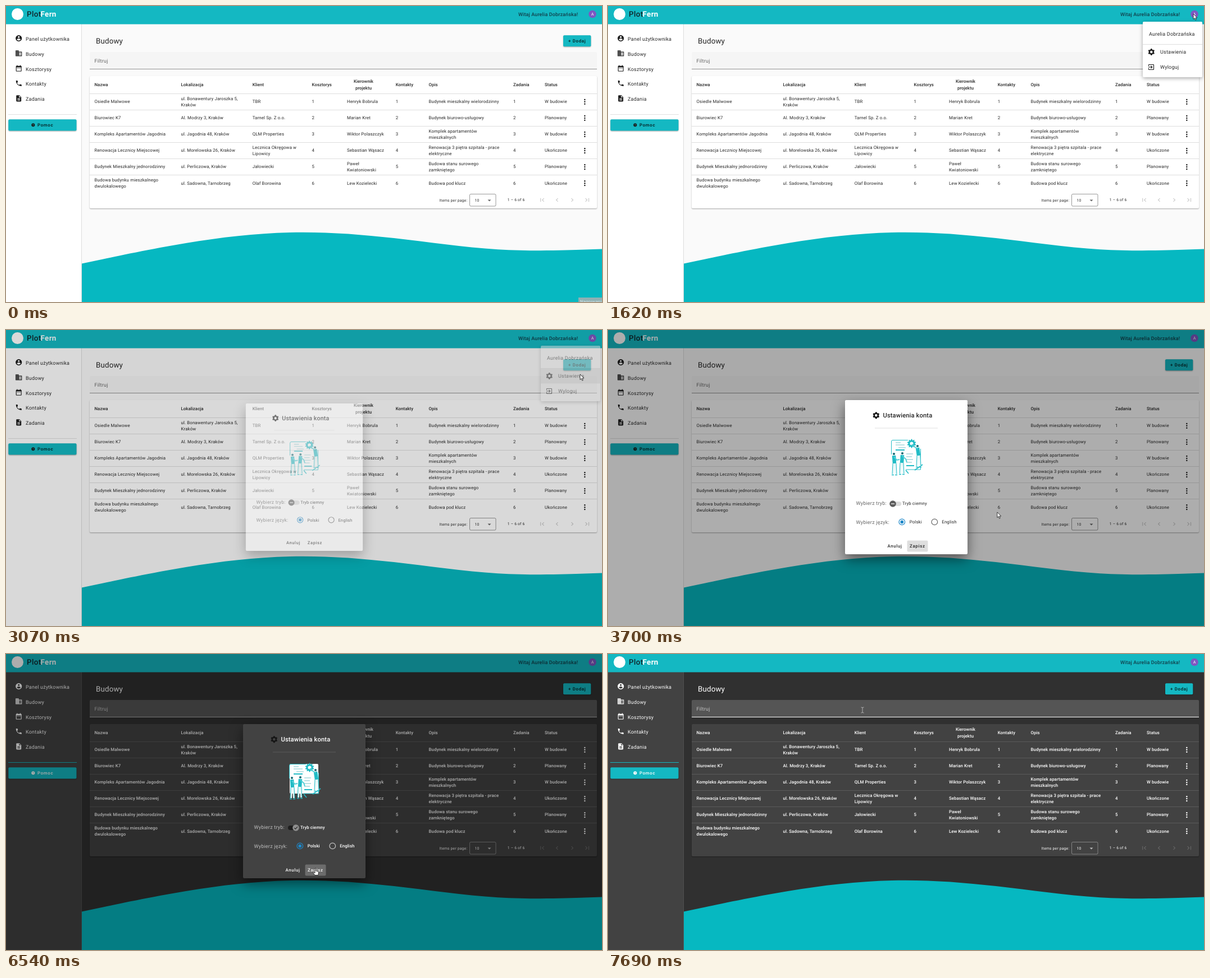
These frames come from a looping animation (1061x528 px, 8000 ms). An HTML page with a canvas:

```html
<!DOCTYPE html>
<html lang="pl">
<head>
<meta charset="utf-8">
<style>
html, body { margin: 0; width: 100%; height: 100%; overflow: hidden; background: #fafafa; }
canvas { display: block; }
</style>
</head>
<body>
<canvas id="stage" width="1061" height="528"></canvas>
<script>
const stage = document.getElementById('stage');
const sheet = stage.cloneNode();
const sheetCtx = sheet.getContext('2d');
let c = stage.getContext('2d');
const LOOP = 8000, K = 0.5593; // K: stage pixels per page pixel
const TEAL = '#14b8c2';

const LIGHT = {
  page: '#fafafa', panel: '#fff', edge: '#dcdcdc', ink: 'rgba(0,0,0,.85)', icon: '#1c1c1c',
  line: 'rgba(0,0,0,.13)', field: '#f5f5f5', under: 'rgba(0,0,0,.42)', underHover: 'rgba(0,0,0,.87)',
  off: 'rgba(0,0,0,.22)', soft: 'rgba(0,0,0,.6)', box: 'rgba(0,0,0,.4)', rule: '#e0e0e0',
  press: 'rgba(0,0,0,.13)', radio: 'rgba(0,0,0,.6)', body: { w: 400, ls: 0.25 }
};
const DARK = {
  page: '#303030', panel: '#424242', edge: '#505050', ink: '#fff', icon: '#fff',
  line: 'rgba(255,255,255,.13)', field: '#555', under: 'rgba(255,255,255,.6)', underHover: '#fff',
  off: 'rgba(255,255,255,.2)', soft: 'rgba(255,255,255,.65)', box: 'rgba(255,255,255,.35)', rule: TEAL,
  press: 'rgba(255,255,255,.22)', radio: 'rgba(255,255,255,.7)', body: { w: 500, ls: 0.13 }
};

const HEADS = ['Nazwa', 'Lokalizacja', 'Klient', 'Kosztorys', '', 'Kontakty', 'Opis', 'Zadania', 'Status'];
const COLS = [157.5, 311.5, 438.7, 544.5, 607, 693.7, 752.5, 903, 959];
const ROWS = [
  ['Osiedle Malwowe', 'ul. Bonawentury Jaroszka 5,|Kraków', 'TBR', 'Henryk Bobrula', 'Budynek mieszkalny wielorodzinny', 'W budowie'],
  ['Biurowiec K7', 'Al. Modrzy 3, Kraków', 'Tarnel Sp. Z o.o.', 'Marian Kret', 'Budynek biurowo-usługowy', 'Planowany'],
  ['Kompleks Apartamentów Jagodnia', 'ul. Jagodnia 48, Kraków', 'QLM Properties', 'Wiktor Polaszczyk', 'Komplek apartamentów|mieszkalnych', 'W budowie'],
  ['Renowacja Lecznicy Miejscowej', 'ul. Morelowska 26, Kraków', 'Lecznica Okręgowa w|Lipowicy', 'Sebastian Wąsacz', 'Renowacja 3 piętra szpitala - prace|elektryczne', 'Ukończone'],
  ['Budynek Mieszkalny jednorodzinny', 'ul. Perliczowa, Kraków', 'Jałowiecki', 'Paweł|Kwiatoniowski', 'Budowa stanu surowego|zamkniętego', 'Planowany'],
  ['Budowa budynku mieszkalnego|dwulokalowego', 'ul. Sadowna, Tarnobrzeg', 'Olaf Borowina', 'Lew Kozielecki', 'Budowa pod klucz', 'Ukończone']
];
const USER = 'Aurelia Dobrzańska';

const windows = [5, 9, 13, 17].map(y => `M4 ${y}h2v2h-2zM8 ${y}h2v2h-2z`).join('');
const ICON = {
  user: 'M12 2a10 10 0 1 0 0 20a10 10 0 1 0 0-20zM12 5a3 3 0 1 1 0 6a3 3 0 1 1 0-6zM12 19.2c-2.5 0-4.71-1.28-6-3.22.03-1.99 4-3.08 6-3.08 1.99 0 5.97 1.09 6 3.08-1.29 1.94-3.5 3.22-6 3.22z',
  building: 'M2 3h10v4h10v14H2z' + windows + 'M12 9h8v10h-8v-2h2v-2h-2v-2h2v-2h-2zM16 11h2v2h-2zM16 15h2v2h-2z',
  calendar: 'M5 4h1V2h2v2h8V2h2v2h1q2 0 2 2v14q0 2-2 2H5q-2 0-2-2V6q0-2 2-2zM5 9v11h14V9zM7 11h2v2H7zM11 11h2v2h-2zM15 11h2v2h-2z',
  phone: 'M6.62 10.79c1.44 2.83 3.76 5.14 6.59 6.59l2.2-2.2c.27-.27.67-.36 1.02-.24 1.12.37 2.33.57 3.57.57q1 0 1 1V20q0 1-1 1A17 17 0 0 1 3 4q0-1 1-1h3.5q1 0 1 1c0 1.25.2 2.45.57 3.57.11.35.03.74-.25 1.02z',
  doc: 'M6 2h8l6 6v12q0 2-2 2H6q-2 0-2-2V4q0-2 2-2zM8 12v2h8v-2zM8 16v2h8v-2zM13 3.5V9h5.5z',
  exit: 'M10.1 15.6L11.5 17l5-5-5-5-1.4 1.4L12.7 11H3v2h9.7zM3 9V5q0-2 2-2h14q2 0 2 2v14q0 2-2 2H5q-2 0-2-2v-4h2v4h14V5H5v4z',
  prev: 'M15.4 7.4L14 6l-6 6 6 6 1.4-1.4L10.8 12z',
  first: 'M18.4 16.6L13.8 12l4.6-4.6L17 6l-6 6 6 6zM6 6h2v12H6z'
};
for (const k in ICON) ICON[k] = new Path2D(ICON[k]);
const ARROW = new Path2D('M0 0V9.6L2.2 7.6 3.7 11.2 5.3 10.5 3.8 7H6.9z');
const HAND = new Path2D('M-1 1Q-1 0 0 0T1 1V5L4 5.6Q5.5 6 5.4 7.5L4.8 12.5H-1.2L-4 8.2Q-4.4 6.8-3.2 7L-1 8.6z');
const IBEAM = new Path2D('M-2.5 -5Q0 -5 0 -3.8Q0 -5 2.5 -5M0 -4V4M-2.5 5Q0 5 0 3.8Q0 5 2.5 5');
const WAVE = wavePath([459.5, 420, 398, 411.5, 440, 433.5], 135, 926 / 5);

// Cubic B-spline through evenly spaced control heights, closed along the bottom.
function wavePath(ys, left, step) {
  const path = new Path2D(), last = ys.length - 1;
  const at = (i, u) => [left + (i + u) * step, ys[i] + (ys[i + 1] - ys[i]) * u];
  path.moveTo(left, ys[0]);
  path.lineTo(...at(0, 1 / 6));
  for (let i = 0; i < last; i++) {
    const end = i < last - 1
      ? [left + (i + 1) * step, (ys[i] + 4 * ys[i + 1] + ys[i + 2]) / 6]
      : at(i, 5 / 6);
    path.bezierCurveTo(...at(i, 1 / 3), ...at(i, 2 / 3), ...end);
  }
  path.lineTo(left + last * step, ys[last]);
  path.lineTo(left + last * step, 528);
  path.lineTo(left, 528);
  return path;
}

const part = (t, a, b) => Math.min(1, Math.max(0, (t - a) / (b - a)));
const within = (p, x, y, w, h) => p.x >= x && p.x <= x + w && p.y >= y && p.y <= y + h;

function rect(x, y, w, h, fill, r = 0) {
  c.fillStyle = fill;
  c.beginPath();
  c.roundRect(x, y, w, h, r);
  c.fill();
}
function card(x, y, w, h, fill, blur = 2, dy = 1, shade = 'rgba(0,0,0,.35)') {
  c.save();
  c.shadowColor = shade;
  c.shadowBlur = blur;
  c.shadowOffsetY = dy;
  rect(x, y, w, h, fill, 2);
  c.restore();
}
function disc(x, y, r, fill) {
  c.fillStyle = fill;
  c.beginPath();
  c.arc(x, y, r, 0, 7);
  c.fill();
}
function stroke(path, color, width = 1) {
  c.strokeStyle = color;
  c.lineWidth = width;
  c.stroke(new Path2D(path));
}
function text(s, x, y, size, color, { w = 400, ls = 0.25, align = 'left' } = {}) {
  const px = size * K;
  c.textRendering = 'geometricPrecision';
  c.font = `${w} ${px}px Roboto, sans-serif`;
  c.letterSpacing = ls * K + 'px';
  c.textAlign = align;
  c.fillStyle = color;
  c.fillText(s, x, y + px * 0.355);
}
function icon(name, x, y, color, scale = K, flip = 1) {
  c.save();
  c.translate(x, y);
  c.scale(scale * flip, scale);
  c.translate(-12, -12);
  c.fillStyle = color;
  c.fill(ICON[name], 'evenodd');
  c.restore();
}
function gear(x, y, r, color, teeth = 6) {
  c.fillStyle = color;
  c.beginPath();
  for (let i = 0; i < teeth * 4; i++) {
    const a = (i - 0.5) * Math.PI / teeth / 2, d = i % 4 < 2 ? r : r * 0.76;
    c.lineTo(x + d * Math.sin(a), y - d * Math.cos(a));
  }
  c.closePath();
  c.moveTo(x + r * 0.37, y);
  c.arc(x, y, r * 0.37, 0, 7);
  c.fill('evenodd');
}
// Paints a group on its own sheet, then fades it in as one.
function layer(alpha, scale, x, y, paint) {
  if (alpha <= 0) return;
  const main = c;
  c = sheetCtx;
  c.clearRect(0, 0, 1061, 528);
  c.save();
  c.translate(x, y);
  c.scale(scale, scale);
  c.translate(-x, -y);
  paint();
  c.restore();
  c = main;
  c.globalAlpha = alpha;
  c.drawImage(sheet, 0, 0);
  c.globalAlpha = 1;
}

const MOVES = [
  [60, 1012, 526], [860, 1040, 46], [1200, 1042, 14], [1640, 1042, 14], [1680, 1036, 30],
  [2370, 1022, 79], [3130, 1022, 79], [3700, 693, 325], [4460, 510, 311], [4800, 510, 311],
  [5350, 551, 382], [6570, 551, 382], [7340, 455, 132], [7690, 453, 100]
];
function pointer(t) {
  const i = MOVES.findIndex(m => m[0] > t);
  if (i < 0) return { x: 453, y: 100 };
  const a = MOVES[Math.max(0, i - 1)], b = MOVES[i];
  const p = part(t, a[0], b[0]), e = (p + p * p * (3 - 2 * p)) / 2;
  return { x: a[1] + (b[1] - a[1]) * e, y: a[2] + (b[2] - a[2]) * e };
}

function header() {
  rect(0, 0, 1061, 32.6, TEAL);
  disc(20.5, 14.5, 10.5, '#fff');
  text('Plot', 37, 14.5, 24, '#10242a', { w: 500, ls: 0.6 });
  text('Fern', 61.5, 14.5, 24, '#fff', { w: 700, ls: 0.6 });
  text(`Witaj ${USER}!`, 912, 14.5, 16, '#123f4a', { w: 500 });
  disc(1044, 14.5, 6.8, '#7e57c2');
  text('A', 1044, 14.7, 13, '#fff', { align: 'center', ls: 0 });
}

function sidebar(T) {
  rect(0, 32, 134, 496, T.panel);
  rect(134, 32, 1, 496, T.edge);
  [['user', 'Panel użytkownika'], ['building', 'Budowy'], ['calendar', 'Kosztorysy'], ['phone', 'Kontakty'], ['doc', 'Zadania']]
    .forEach(([name, label], i) => {
      const y = 58.8 + i * 26.8;
      icon(name, 22.7, y - 1.2, T.icon);
      text(label, 35, y, 16, T.ink, { ls: 0.45 });
    });
  rect(4, 193, 122, 1, T.rule);
  card(4.3, 202.3, 121.2, 20.2, TEAL);
  disc(48.3, 212.3, 3, T.icon);
  text('?', 48.3, 212.4, 8, TEAL, { w: 700, align: 'center', ls: 0 });
  text('Pomoc', 56, 212.3, 14, T.ink, { w: 500, ls: 1.25 });
}

function table(T) {
  card(149, 125, 903, 236, T.panel);
  HEADS.forEach((s, i) => text(s, COLS[i], 140.5, 14, T.ink, { w: 500, ls: 0.1 }));
  ['Kierownik', 'projektu'].forEach((s, i) =>
    text(s, 636.5, 134 + i * 12.3, 14, T.ink, { w: 500, ls: 0.1, align: 'center' }));
  ROWS.forEach(([name, place, client, boss, about, state], i) => {
    const y = 170.4 + i * 29.08, n = String(i + 1);
    rect(149, Math.round(y - 14.6), 903, 1, T.line);
    [name, place, client, n, boss, n, about, n, state].forEach((s, col) => {
      const lines = s.split('|');
      lines.forEach((l, k) => text(l, COLS[col], y + (k - (lines.length - 1) / 2) * 11.3, 14, T.ink, T.body));
    });
    for (const d of [-3.9, 0, 3.9]) disc(1030.3, y + 0.4 + d, 1.25, T.icon);
  });
  text('Items per page:', 771.7, 346.5, 12, T.ink, { ls: 0.4 });
  c.strokeStyle = T.box;
  c.lineWidth = 1;
  c.beginPath();
  c.roundRect(825.5, 335.5, 46.5, 21.5, 2);
  c.stroke();
  text('10', 834.5, 346.5, 12, T.ink, { ls: 0.4 });
  c.fillStyle = T.soft;
  c.fill(new Path2D('M857.5 345.5h6l-3 3z'));
  text('1 – 6 of 6', 892.8, 346, 12, T.ink, { ls: 0.4 });
  icon('first', 954.5, 346, T.off);
  icon('prev', 981, 346, T.off);
  icon('prev', 1008, 346, T.off, K, -1);
  icon('first', 1034.7, 346, T.off, K, -1);
}

function page(t, T, over) {
  rect(0, 0, 1061, 528, T.page);
  c.fillStyle = '#06b8c1';
  c.fill(WAVE);
  sidebar(T);
  header();
  text('Budowy', 160, 62.5, 24, T.ink, { ls: 0.2 });
  card(992, 52.3, 49.3, 20, TEAL);
  text('+ Dodaj', 1001, 62.3, 14, 'rgba(0,0,0,.87)', { w: 500, ls: 1.25 });
  rect(149, 82, 903, 30, T.field, [2, 2, 0, 0]);
  rect(149, 112, 903, 1, over ? T.underHover : T.under);
  text('Filtruj', 157.5, 97.5, 16, t < 4850 ? LIGHT.soft : T.soft, { ls: 0.45 });
  table(T);
  if (t < 400) {
    rect(1019, 520, 42, 8, '#8fb0b3');
    text('Nagrywanie', 1022, 527, 14, '#dfe9ea');
  }
}

function menu(t) {
  const open = part(t, 1450, 1570);
  layer(open * (1 - part(t, 3010, 3130)), 0.8 + 0.2 * open, 1058, 28, () => {
    card(952, 28, 106, 99, '#fff', 7, 2);
    if (t > 2920) rect(952, 68.5, 106, 27, 'rgba(0,0,0,.1)');
    rect(952, 68, 106, 1, '#dedede');
    text(USER, 963, 50, 16, LIGHT.ink, { ls: 0.45 });
    gear(967.3, 82, 6, '#1c1c1c');
    text('Ustawienia', 983, 82, 16, LIGHT.ink, { ls: 0.45 });
    icon('exit', 967, 109, '#1c1c1c');
    text('Wyloguj', 983, 109, 16, LIGHT.ink, { ls: 0.45 });
  });
}

function worker(x, y, lean, arm) {
  disc(x + lean, y - 1, 2.1, '#176b75');
  stroke(`M${x + lean} ${y + 2}L${x} ${y + 16}`, '#22bcc6', 6.5);
  stroke(`M${x - 1.5} ${y + 16}L${x - 2.5} ${y + 35}M${x + 1.5} ${y + 16}L${x + 2.5} ${y + 35}`, '#e6f7f8', 3);
  stroke(`M${x - 3} ${y + 16}L${x - 4} ${y + 35}M${x + 3} ${y + 16}L${x + 4} ${y + 35}`, '#22bcc6', 1);
  stroke(`M${x - 5} ${y + 36.5}h4M${x + 1} ${y + 36.5}h4`, '#22bcc6', 1.4);
  stroke(`M${x + lean} ${y + 4}${arm}`, '#51cfd6', 2);
}
function illustration() {
  rect(505, 196, 51, 53, '#fff', 2);
  stroke('M504.500 222V199Q504.500 196.500 507 196.500H534M556.500 212V249H530', '#22bcc6', 1);
  stroke('M512 201h9M512 205h16M517 210h13M531 221h12M531 226h10M531 231h12M531 236h10', '#a5d8dc', 1.4);
  stroke('M512 214h16M531 242h14', '#22bcc6', 2);
  gear(540.5, 202.5, 8, '#22bcc6', 10);
  stroke('M546 250L560 240M530 250l5 6', '#22bcc6', 1.6);
  worker(510, 222, -1, 'l5 6l5 -1');
  worker(523, 221, 1, 'l6 5l2 6');
  worker(553, 208, -2, 'l-7 -5l-3 -3');
}

function toggle(t, dark) {
  const p = part(t, 4770, 4850), x = 507 + 9 * p;
  if (t > 4480 && t < 5000) disc(x, 310, 10.5, 'rgba(0,0,0,.07)');
  rect(502, 306, 20, 8, !dark ? '#dcdcdc' : p < 0.5 ? '#606060' : '#1e1e1e', 4);
  disc(x, 310, 5.8, !dark ? '#5c5c5c' : p < 0.5 ? '#212121' : '#8e8e8e');
  if (p < 0.5) stroke(`M${x - 3} 310h6`, dark ? '#424242' : '#fff', 1.2);
  else stroke(`M${x - 2.7} 310.200l1.900 1.900l3.800 -4`, '#252525', 1.2);
}
function radio(x, color, on) {
  c.strokeStyle = color;
  c.lineWidth = 1.2;
  c.beginPath();
  c.arc(x, 342.4, 5.3, 0, 7);
  c.stroke();
  if (on) disc(x, 342.4, 2.9, color);
}

function dialog(t, T, p) {
  const shown = part(t, 2995, 3145), gone = part(t, 6640, 6715);
  const scale = 0.7 + 0.3 * (1 - (1 - shown) ** 2.7);
  layer(shown * (1 - gone), scale, 531, 262.5, () => {
    card(422, 125, 218, 275, T.panel, 22, 9, 'rgba(0,0,0,.5)');
    gear(477.3, 152.3, 6.2, '#151515');
    text('Ustawienia konta', 489.5, 152, 20, T.ink, { w: 500, ls: 0.2 });
    rect(475, 174.5, 112, 1, T.line);
    illustration();
    text('Wybierz tryb:', 441.5, 309.3, 16, T.soft, { ls: 0.45 });
    toggle(t, T === DARK);
    text('Tryb ciemny', 524, 309.5, 14, T.ink, T.body);
    text('Wybierz język:', 441.5, 342.5, 16, T.soft, { ls: 0.45 });
    radio(523.3, '#1e88c9', true);
    radio(581.3, t < 4850 ? LIGHT.radio : T.radio, false);
    text('Polski', 536.7, 342.5, 14, T.ink, T.body);
    text('English', 594.3, 342.5, 14, T.ink, T.body);
    const focused = t > 3145 && t < 4590;
    if (focused || within(p, 533, 376, 36, 19)) rect(532.5, 375.5, 37, 20, T.press, 2);
    text('Anuluj', 497.5, 385.3, 14, T.ink, { w: 500, ls: 1.25 });
    text('Zapisz', 537, 385.3, 14, T.ink, { w: 500, ls: 1.25 });
  });
}

function cursor(t, p, over, modal, dark) {
  if (t < 60) return;
  const hand = modal
    ? within(p, 500, 303, 24, 14) || within(p, 533, 376, 36, 19)
    : within(p, 992, 52, 49, 20) && t < 900 || t > 1000 && t < 1450 && p.y < 22 || t > 1700 && t < 2950 && p.y > 68;
  c.save();
  c.translate(p.x, p.y);
  c.lineWidth = 0.8;
  if (over) {
    c.strokeStyle = dark ? '#c8c8c8' : '#333';
    c.stroke(IBEAM);
  } else {
    const shape = hand ? HAND : ARROW;
    c.fillStyle = '#fff';
    c.strokeStyle = '#111';
    c.fill(shape);
    c.stroke(shape);
  }
  c.restore();
}

function draw(now) {
  const t = now % LOOP, dark = t >= 4750, T = dark ? DARK : LIGHT, p = pointer(t);
  const modal = t > 2960 && t < 6640;
  const over = !modal && (t < 1000 || t > 7000) && within(p, 149, 82, 903, 30);
  page(t, T, over);
  menu(t);
  const dim = (1 - (1 - part(t, 2995, 3395)) ** 3) * (1 - part(t, 6640, 7040)) ** 3;
  rect(0, 0, 1061, 528, `rgba(0,0,0,${0.32 * dim})`);
  dialog(t, T, p);
  cursor(t, p, over, modal, dark);
}

const start = performance.now();
function frame() {
  draw(performance.now() - start);
  requestAnimationFrame(frame);
}
frame();
</script>
</body>
</html>
```
